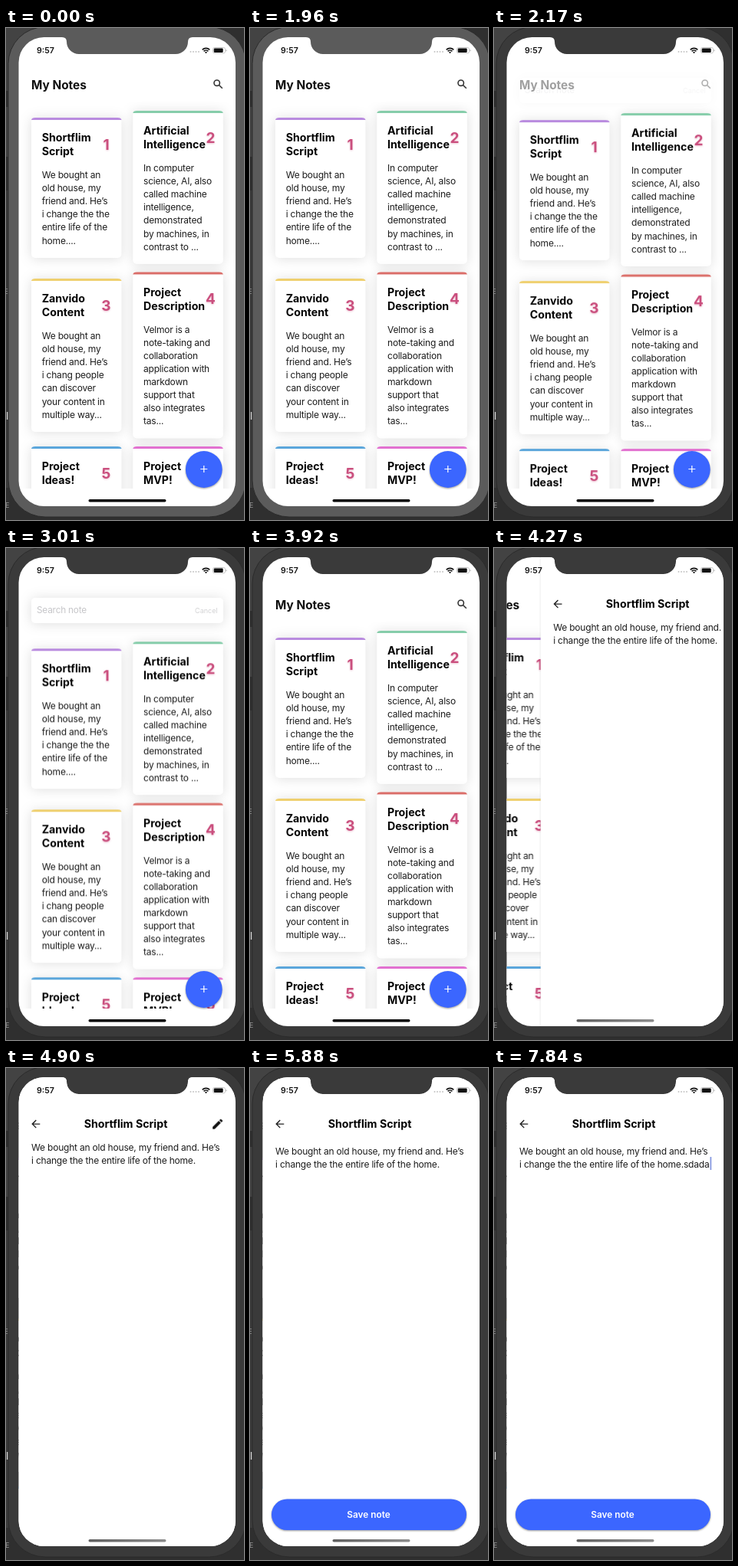
An HTML page for the animation above (8000 ms loop, 310 px wide and 642 px high).

```html
<!DOCTYPE html>
<html lang="en">
<head>
<meta charset="utf-8">
<title>Notes app</title>
<style>
html, body { margin: 0; width: 100%; height: 100%; overflow: hidden; background: #2f2f2f; }
svg { display: block; }
text { font-family: Inter, sans-serif; fill: #111; }
.body { font-size: 12px; letter-spacing: -.2px; fill: #1c1c1c; }
.title { font-size: 14.2px; font-weight: 700; fill: #050505; }
.count { font-size: 19px; font-weight: 700; fill: #ca4f7e; text-anchor: middle; filter: drop-shadow(0 1px 1px rgba(202, 79, 126, .35)); }
.card { filter: drop-shadow(0 1px 8px rgba(0, 0, 0, .13)); }
.lift { filter: drop-shadow(0 1px 1.2px rgba(0, 0, 0, .4)); }
.mid { text-anchor: middle; }

#frame, #head, #search, #list, #home, #detail, #bar, #pencil, #note, #save, #caret, #typed tspan {
  animation: 8s infinite both;
}
#frame { animation-name: focus; animation-timing-function: step-end; }
#head { animation-name: headOut; animation-timing-function: ease-in-out; }
#search { animation-name: searchIn; animation-timing-function: ease-in-out; }
#list { animation-name: listDown; animation-timing-function: ease-in-out; }
#home { animation-name: pushOut; }
#detail { animation-name: pushIn; }
#bar { animation-name: barIn; animation-timing-function: linear; }
#pencil { animation-name: press; animation-timing-function: step-end; }
#note { animation-name: drop; animation-timing-function: step-end; }
#save { animation-name: saveIn; animation-timing-function: step-end; }
#caret { animation-name: caret; animation-timing-function: step-end; }
#typed tspan { fill: transparent; animation-timing-function: step-end; }
#typed tspan:nth-child(1) { animation-name: key1; }
#typed tspan:nth-child(2) { animation-name: key2; }
#typed tspan:nth-child(3) { animation-name: key3; }
#typed tspan:nth-child(4) { animation-name: key4; }
#typed tspan:nth-child(5) { animation-name: key5; }

@keyframes focus { 0% { fill: #5b5b5b; } 25.375%, to { fill: #3a3a3a; } }
@keyframes headOut { 0%, 25.3% { opacity: 1; } 29%, 45% { opacity: 0; } 48.2%, to { opacity: 1; } }
@keyframes searchIn { 0%, 25.3% { opacity: 0; } 31%, 43.7% { opacity: 1; } 47.6%, to { opacity: 0; } }
@keyframes listDown {
  0%, 25.3% { transform: translateY(0); }
  31%, 43.7% { transform: translateY(14.3px); }
  48.2%, to { transform: translateY(0); }
}
/* critically damped spring */
@keyframes pushIn {
  0% { transform: translateX(283px); visibility: hidden; }
  51.1% {
    transform: translateX(283px); visibility: hidden;
    animation-timing-function: linear(0, .087 5%, .256 10%, .431 15%, .581 20%, .7 25%, .79 30%, .855 35%, .901 40%, .955 50%, .98 60%, .992 70%, 1);
  }
  57.8%, to { transform: translateX(0); visibility: visible; }
}
@keyframes pushOut {
  0% { transform: translateX(0); }
  51.1% {
    transform: translateX(0);
    animation-timing-function: linear(0, .087 5%, .256 10%, .431 15%, .581 20%, .7 25%, .79 30%, .855 35%, .901 40%, .955 50%, .98 60%, .992 70%, 1);
  }
  57.8%, to { transform: translateX(-84.9px); }
}
@keyframes barIn { 0%, 51.1% { opacity: 0; } 53.2%, to { opacity: 1; } }
@keyframes press { 0% { opacity: 1; } 71.75% { opacity: .25; } 73.5%, to { opacity: 0; } }
@keyframes drop { 0% { transform: translateY(0); } 73.5%, to { transform: translateY(5px); } }
@keyframes saveIn { 0% { opacity: 0; } 73.5%, to { opacity: 1; } }
@keyframes caret {
  0% { opacity: 0; transform: translateX(248px); }
  84.875% { opacity: 1; transform: translateX(248px); }
  91% { opacity: 1; transform: translateX(254.6px); }
  91.875% { opacity: 1; transform: translateX(261.8px); }
  93.625% { opacity: 1; transform: translateX(268.4px); }
  96.25% { opacity: 1; transform: translateX(275.4px); }
  98%, to { opacity: 1; transform: translateX(281.6px); }
}
@keyframes key1 { 91%, to { fill: #1c1c1c; } }
@keyframes key2 { 91.875%, to { fill: #1c1c1c; } }
@keyframes key3 { 93.625%, to { fill: #1c1c1c; } }
@keyframes key4 { 96.25%, to { fill: #1c1c1c; } }
@keyframes key5 { 98%, to { fill: #1c1c1c; } }
</style>
</head>
<body>
<svg width="310" height="642" viewBox="0 0 310 642">
  <defs>
    <clipPath id="screen">
      <path d="M49.500 12H73q6 0 6 6a16 16 0 0 0 16 16H221a16 16 0 0 0 16-16q0-6 6-6H266a33 33 0 0 1 33 33V591a33 33 0 0 1-33 33H49.500a33 33 0 0 1-33-33V45a33 33 0 0 1 33-33Z"/>
    </clipPath>
    <clipPath id="scroll"><path d="M16 96H300V601H16Z"/></clipPath>
    <linearGradient id="shade"><stop stop-color="#606060"/><stop offset="1" stop-color="#8c8c8c"/></linearGradient>
  </defs>

  <!-- desktop behind the phone -->
  <path fill="#2f2f2f" d="M0 0H310V642H0Z"/>
  <path fill="#434343" d="M0 0H40V55H3V82H0ZM0 103H3V168H0Z"/>
  <path fill="#3b3b3b" d="M0 212H3V600H0Z"/>
  <g style="font-size:9px">
    <text x="-2.500" y="347" style="fill:#999">E</text>
    <text x="-1" y="626" style="fill:#999">E</text>
    <path fill="#ddd" d="M1 501h1.500v10H1Z"/>
  </g>
  <rect id="frame" x="3" y="-1.500" width="309.500" height="639.500" rx="48" stroke="#2b2b2b"/>

  <g clip-path="url(#screen)">
    <path fill="#fff" d="M16 11H300V625H16Z"/>

    <g id="home">
      <g clip-path="url(#scroll)"><g id="list"></g></g>
      <g id="head">
        <text x="33" y="79.500" style="font-size:15.4px;font-weight:700">My Notes</text>
        <g fill="none" stroke="#333" stroke-width="1.600">
          <circle cx="274.700" cy="71.700" r="3.700"/>
          <path d="M277.500 74.500l4.300 4.300"/>
        </g>
      </g>
      <g id="search">
        <rect x="33" y="65" width="250" height="33" rx="5" fill="#fff" class="card"/>
        <text x="40" y="85" class="body" style="font-size:11.8px;fill:#c6c6c9">Search note</text>
        <text x="246" y="84.500" style="font-size:9.1px;fill:#d2d2d4">Cancel</text>
      </g>
      <circle cx="257.800" cy="576" r="23.900" fill="#3b66ff" class="lift"/>
      <path d="M253.300 575.500h9M257.800 571v9" stroke="#fff" stroke-width="1.200"/>
    </g>

    <g id="detail">
      <path fill="#fff" d="M16.500 11H300V625H16.500Z" style="filter:drop-shadow(0 0 1px rgba(0,0,0,.14))"/>
      <path fill="#222" transform="translate(30.500 64.800) scale(.69)" d="M20 11H7.830l5.590-5.590L12 4l-8 8 8 8 1.410-1.410L7.830 13H20z"/>
      <text x="156" y="78" class="title mid">Shortflim Script</text>
      <g id="pencil">
        <path fill="#111" transform="translate(267 64.400) scale(.72)" d="M3 17.250V21h3.750L17.810 9.940l-3.750-3.750zM20.710 7.040a1 1 0 0 0 0-1.410l-2.340-2.340a1 1 0 0 0-1.410 0l-1.830 1.830 3.750 3.750z"/>
      </g>
      <g id="note">
        <text x="33" y="108" class="body">We bought an old house, my friend and. He’s</text>
        <text x="33" y="125.200" class="body" id="typed">i change the the entire life of the home.<tspan>s</tspan><tspan>d</tspan><tspan>a</tspan><tspan>d</tspan><tspan>a</tspan></text>
      </g>
      <g id="caret"><path fill="#5b74d6" d="M0 116h1.300v17H0Z"/></g>
      <g id="save">
        <rect x="28" y="562.500" width="254" height="40.500" rx="20.200" fill="#3b66ff" class="lift"/>
        <text x="154.500" y="587.200" class="mid" style="font-size:11.8px;font-weight:600;fill:#fff">Save note</text>
      </g>
    </g>

    <!-- status bar and home indicator -->
    <text x="40" y="33" style="font-size:10.6px;font-weight:600">9:57</text>
    <g fill="#c4c4c4">
      <circle cx="240.500" cy="31" r="1"/><circle cx="244" cy="31" r="1"/>
      <circle cx="247.500" cy="31" r="1"/><circle cx="251" cy="31" r="1"/>
    </g>
    <g fill="none" stroke="#111" stroke-width="1.600">
      <path d="M255.700 28.300a7 7 0 0 1 9.600 0M257.600 30.400a4.200 4.200 0 0 1 5.800 0"/>
      <path fill="#111" stroke="none" d="M260.500 33.300l-1.600-1.600a2.300 2.300 0 0 1 3.200 0Z"/>
    </g>
    <rect x="269.500" y="25.500" width="16" height="7.500" rx="2.200" fill="none" stroke="#bbb" stroke-width=".8"/>
    <rect x="270.700" y="26.600" width="12" height="5.300" rx="1.200" fill="#111"/>
    <path fill="#bbb" d="M286.400 28q1.200.2 1.200 1.300t-1.200 1.300Z"/>
    <rect x="107.500" y="615" width="101" height="3.500" rx="1.700" fill="#050505"/>
    <g id="bar">
      <rect x="106.500" y="614" width="103" height="5.500" fill="#fff"/>
      <rect x="107.500" y="615" width="101" height="3.500" rx="1.700" fill="url(#shade)"/>
    </g>
  </g>
</svg>
<script>
const LEFT = 33, RIGHT = 165.3, WIDTH = 117.5, LEADING = 17.1;
const cards = [
  [LEFT, 117, 183, '#b98bdf', 'Shortflim|Script', 'We bought an|old house, my|friend and. He’s|i change the the|entire life of the|home....'],
  [RIGHT, 108, 200, '#86cdaa', 'Artificial|Intelligence', 'In computer|science, AI, also|called machine|intelligence,|demonstrated|by machines, in|contrast to ...'],
  [LEFT, 327, 200, '#efd06f', 'Zanvido|Content', 'We bought an|old house, my|friend and. He’s|i chang people|can discover|your content in|multiple way...'],
  [RIGHT, 318.5, 217, '#da6d68', 'Project|Description', 'Velmor is a|note-taking and|collaboration|application with|markdown|support that|also integrates|tas...'],
  [LEFT, 546, 150, '#5ba6db', 'Project|Ideas!', ''],
  [RIGHT, 546, 150, '#e271d0', 'Project|MVP!', '']
];

const lines = (str, cls, x, y, step) => str.split('|')
  .map((s, i) => `<text class="${cls}" x="${x}" y="${y + i * step}">${s}</text>`).join('');

const box = ([x, y, h, color]) => `<g class="card">
  <rect x="${x}" y="${y}" width="${WIDTH}" height="${h}" rx="5" fill="#fff"/>
  <path fill="${color}" d="M${x} ${y + 3}q.5-3 5-3h${WIDTH - 10}q4.500 0 5 3Z"/></g>`;

const words = ([x, y, , , title, text], i) =>
  lines(title, 'title', x + 13.7, y + 31, 18) +
  lines(text, 'body', x + 13.7, y + 79, LEADING) +
  `<text class="count" x="${x === LEFT ? 130.5 : 266.5}" y="${y + 41.8}">${i + 1}</text>`;

document.getElementById('list').innerHTML = cards.map(box).join('') + cards.map(words).join('');
</script>
</body>
</html>
```
